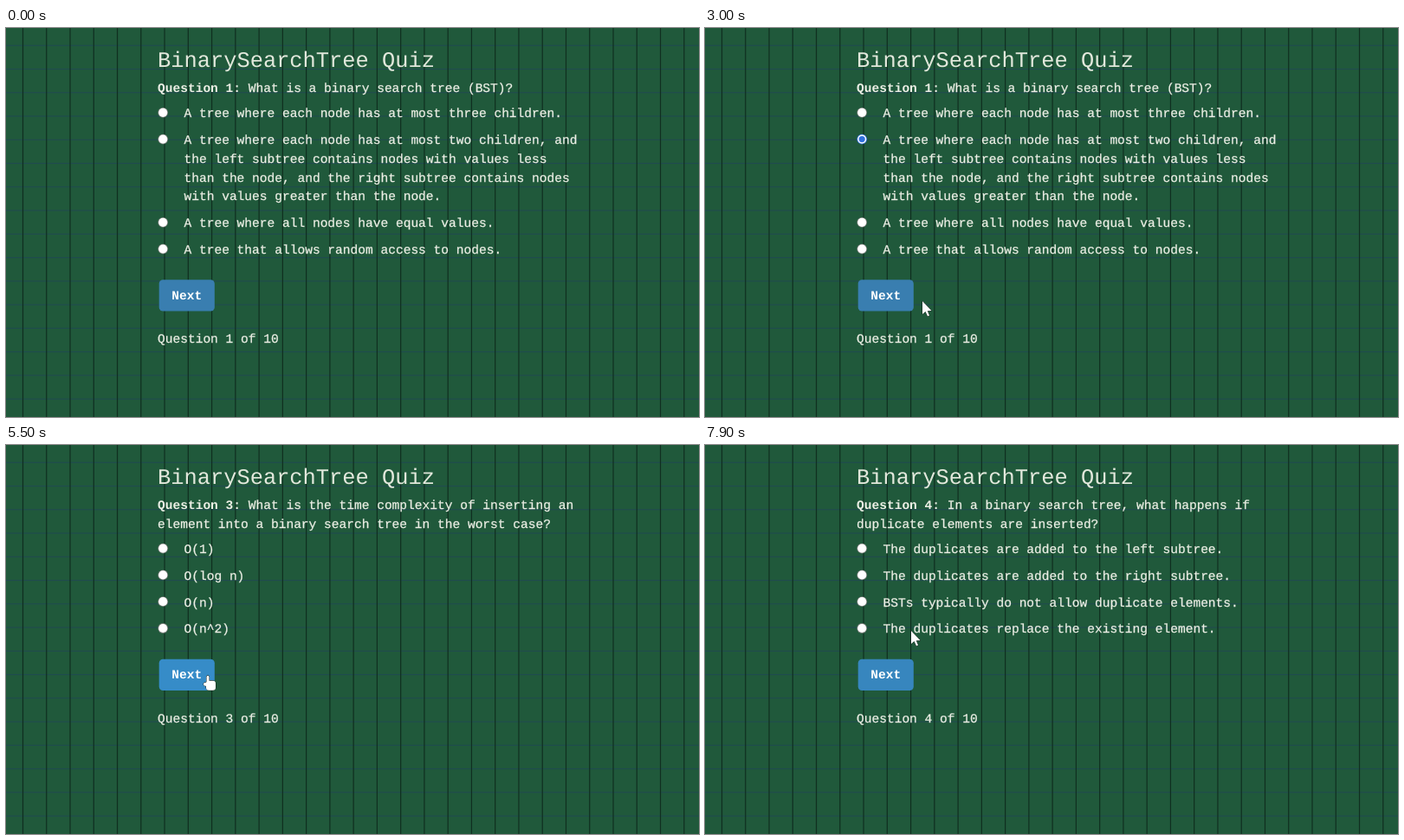
An HTML page with a canvas for the animation above (8 s loop, 800 px wide and 450 px high).

```html
<!DOCTYPE html>
<html lang="en">
<head>
<meta charset="utf-8">
<title>BinarySearchTree Quiz</title>
<style>
html, body { margin: 0; width: 100%; height: 100%; overflow: hidden; background: #20593b; }
canvas { display: block; width: 800px; height: 450px; }
</style>
</head>
<body>
<canvas id="stage" width="800" height="450"></canvas>
<script>
const ctx = document.getElementById('stage').getContext('2d');
const LOOP = 8000, STEP = 100, FADE = 300;
const FONT = '"Courier New", "Liberation Mono", monospace';
const LEFT = 175, INDENT = 205.5, TOP = 74;
const SIZE = 14.55, LINE = 21.8, OPTION_GAP = 30.8, GRID = 27.26;
const RADIO_X = 181.2, BUTTON = { x: 176.7, w: 64.1, h: 36.3 };
const INK = '#edf0e6', TITLE_INK = '#e2e8dc', BLUE = '#3070dc';

const complexities = ['O(1)', 'O(log n)', 'O(n)', 'O(n^2)'];
const questions = [
  { start: 0, picked: 1, pickTime: 2300,
    text: ['What is a binary search tree (BST)?'],
    options: [
      'A tree where each node has at most three children.',
      'A tree where each node has at most two children, and\nthe left subtree contains nodes with values less\nthan the node, and the right subtree contains nodes\nwith values greater than the node.',
      'A tree where all nodes have equal values.',
      'A tree that allows random access to nodes.'] },
  { start: 3300, picked: 0, pickTime: 4000,
    text: ['What is the time complexity of searching', 'for an element in a balanced binary search tree?'],
    options: complexities },
  { start: 5300, picked: 1, pickTime: 6400,
    text: ['What is the time complexity of inserting an', 'element into a binary search tree in the worst case?'],
    options: complexities },
  { start: 7600,
    text: ['In a binary search tree, what happens if', 'duplicate elements are inserted?'],
    options: [
      'The duplicates are added to the left subtree.',
      'The duplicates are added to the right subtree.',
      'BSTs typically do not allow duplicate elements.',
      'The duplicates replace the existing element.'] }
];

function layout(q) {
  let y = TOP + (q.text.length - 1) * LINE + 29.2;
  q.rows = q.options.map(text => {
    const row = { y, lines: text.split('\n') };
    y += OPTION_GAP + (row.lines.length - 1) * LINE;
    return row;
  });
  q.buttonTop = y - 0.5;
  q.progressY = q.buttonTop + 72.8;
}
questions.forEach(layout);

const at = (time, x, y) => ({ time, x, y });
const atRadio = (time, q, row) => at(time, RADIO_X + 1, questions[q].rows[row].y - 6);
const atNext = (time, q) => at(time, 233, questions[q].buttonTop + 19);

// The pointer eases from one stop to the next
const stops = [
  at(100, 560, 380), atRadio(900, 0, 0), atRadio(1300, 0, 0),
  at(1800, 197, 129), atRadio(2300, 0, 1),
  at(3000, 251, 316), atNext(3200, 0), at(3400, 239, 310),
  atRadio(4000, 1, 0), at(4700, 395, 277),
  atNext(5200, 1), atNext(5700, 1),
  at(6300, 188, 153), atRadio(6400, 2, 1), at(7000, 284, 260),
  atNext(7400, 2), atNext(7700, 2), at(7900, 238, 215)
];

function pointerAt(t) {
  if (t < stops[0].time) return null;
  const i = stops.findIndex(s => s.time > t);
  if (i < 0) return stops[stops.length - 1];
  const a = stops[i - 1], b = stops[i];
  const k = (t - a.time) / (b.time - a.time), ease = k * k * (3 - 2 * k);
  return { x: a.x + (b.x - a.x) * ease, y: a.y + (b.y - a.y) * ease };
}

const questionAt = t => questions.findLastIndex(q => t >= q.start);

function overButton(t) {
  const p = pointerAt(t);
  if (!p) return false;
  const dx = p.x - BUTTON.x, dy = p.y - questions[questionAt(t)].buttonTop;
  return dx >= 0 && dx <= BUTTON.w && dy >= 0 && dy <= BUTTON.h;
}

// The share of recent time spent over the button sets its colour fade
function buttonGlow(t) {
  const samples = 20;
  let hits = 0;
  for (let i = 0; i < samples; i++) {
    const past = t - i * FADE / samples;
    if (past >= 0 && overButton(past)) hits++;
  }
  return hits / samples;
}

function write(text, x, y, weight = 'normal', size = SIZE) {
  ctx.font = `${weight} ${size}px ${FONT}`;
  ctx.fillText(text, x, y);
}

function writeBody(text, x, y) {
  ctx.fillStyle = ctx.strokeStyle = INK;
  ctx.lineWidth = 0.25;
  write(text, x, y);
  ctx.strokeText(text, x, y);
}

function drawBoard() {
  ctx.fillStyle = '#20593b';
  ctx.fillRect(0, 0, 800, 450);
  ctx.fillStyle = '#204b4f';
  for (let y = 19.7; y < 450; y += GRID) ctx.fillRect(0, y, 800, 1.1);
  ctx.fillStyle = '#102f20';
  for (let x = 18.9; x < 800; x += GRID) ctx.fillRect(x, 0, 1.2, 450);
}

function disc(x, y, r, color) {
  ctx.fillStyle = color;
  ctx.beginPath();
  ctx.arc(x, y, r, 0, 2 * Math.PI);
  ctx.fill();
}

function drawRadio(y, on) {
  disc(RADIO_X, y, 5.9, on ? BLUE : '#767d78');
  disc(RADIO_X, y, 5.1, '#fff');
  if (on) disc(RADIO_X, y, 3.6, BLUE);
}

function drawButton(top, glow) {
  const mix = (a, b) => Math.round(a + (b - a) * glow);
  ctx.fillStyle = `rgb(${mix(57, 54)},${mix(126, 140)},${mix(176, 200)})`;
  ctx.beginPath();
  ctx.roundRect(BUTTON.x, top, BUTTON.w, BUTTON.h, 4.5);
  ctx.fill();
  ctx.fillStyle = '#fff';
  write('Next', 191.2, top + 22.4, 'bold');
}

function paintPointer(shape) {
  ctx.lineWidth = 1;
  ctx.lineJoin = 'round';
  ctx.fillStyle = '#fff';
  ctx.strokeStyle = '#18231d';
  ctx.stroke(shape);
  ctx.fill(shape);
}

const arrow = new Path2D('M0 0V15L3.5 12 6 17.5 8 16.5 5.8 11.2 10.5 11Z');

const hand = new Path2D();
hand.roundRect(-1.5, 0, 3, 12, 1.5);
hand.roundRect(-2, 6, 11, 11, 3);
hand.roundRect(-5, 8, 5, 4, 2);

const beam = new Path2D('M-3-8H3V-7H.5V7H3V8H-3V7H-.5V-7H-3Z');

function drawPointer(t, progressY) {
  const p = pointerAt(t);
  if (!p) return;
  const overText = Math.abs(p.y - progressY + 5) < 11 && p.x > LEFT && p.x < 315;
  ctx.save();
  ctx.translate(p.x, p.y);
  if (overText) {
    ctx.fillStyle = INK;
    ctx.fill(beam);
  } else {
    paintPointer(overButton(t) ? hand : arrow);
  }
  ctx.restore();
}

function draw(t) {
  const index = questionAt(t), q = questions[index];
  drawBoard();
  ctx.fillStyle = TITLE_INK;
  write('BinarySearchTree Quiz', LEFT, 45, 'normal', 25.4);
  ctx.fillStyle = INK;
  write(`Question ${index + 1}:`, LEFT, TOP, 'bold');
  const afterLabel = LEFT + ctx.measureText('Question 1: ').width;
  q.text.forEach((line, i) => writeBody(line, i ? LEFT : afterLabel, TOP + i * LINE));
  q.rows.forEach((row, i) => {
    drawRadio(row.y - 5.4, i === q.picked && t >= q.pickTime);
    row.lines.forEach((line, j) => writeBody(line, INDENT, row.y + j * LINE));
  });
  writeBody(`Question ${index + 1} of 10`, LEFT, q.progressY);
  drawButton(q.buttonTop, buttonGlow(t));
  drawPointer(t, q.progressY);
}

ctx.textRendering = 'geometricPrecision';
const begin = performance.now();
function tick() {
  const t = (performance.now() - begin) % LOOP;
  draw(Math.floor(t / STEP) * STEP);
  requestAnimationFrame(tick);
}
tick();
</script>
</body>
</html>
```
